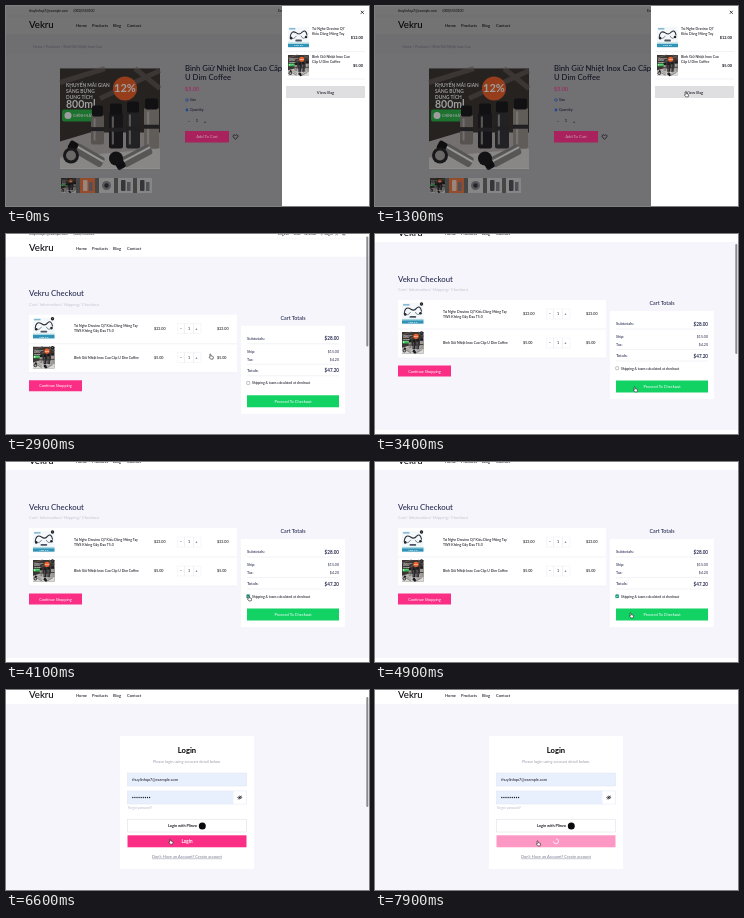
Recreate the animation shown at these times as an HTML page. Size 363 px wide and 200 px high, loop 8000 ms.

```html
<!DOCTYPE html>
<html lang="en">
<head>
<meta charset="utf-8">
<title>Shop checkout</title>
<style>
html, body { margin: 0; width: 100%; height: 100%; overflow: hidden; background: #fff; }
svg { display: block; width: 100vw; height: 100vh; font-family: Lato, "Open Sans", sans-serif; }
</style>
</head>
<body>
<svg id="stage" viewBox="0 0 363 200"></svg>
<script>
const PINK = '#fb2e86', NAVY = '#252b50', INK = '#151520', GREY = '#9a9dae', PALE = '#f6f5fb', GREEN = '#12d264';
const BRAND = 'Vekru', EMAIL = 'thuylinhqa7@example.com';
const FLASK = 'Bình Giữ Nhiệt Inox Cao Cấp';

const rect = (x, y, w, h, fill, more = '') =>
  `<rect x="${x}" y="${y}" width="${w}" height="${h}" fill="${fill}" ${more}/>`;
const circle = (x, y, r, fill, more = '') => `<circle cx="${x}" cy="${y}" r="${r}" fill="${fill}" ${more}/>`;
const path = (d, stroke, width = 0.6, fill = 'none', more = '') =>
  `<path d="${d}" stroke="${stroke}" stroke-width="${width}" fill="${fill}" ${more}/>`;
const line = (x1, x2, y, stroke = '#e6e6ee') => path(`M${x1} ${y}H${x2}`, stroke, 0.5);
const shade = (x, y, w, h, opacity) => rect(x, y, w, h, '#000', `opacity="${opacity}"`);
// y is the vertical middle of the lettering
const text = (s, x, y, size = 3.5, fill = INK, weight = 400, anchor = 'start', more = '') =>
  `<text x="${x}" y="${y + size * 0.35}" font-size="${size}" fill="${fill}" font-weight="${weight}" text-anchor="${anchor}" ${more}>${s.replace(/&/g, '&amp;')}</text>`;
const mid = (s, x, y, size, fill, weight, more) => text(s, x, y, size, fill, weight, 'middle', more);
const end = (s, x, y, size, fill, weight) => text(s, x, y, size, fill, weight, 'end');
const group = (id, body, more = '') => `<g id="${id}" ${more}>${body}</g>`;
const place = (x, y, scale, body) => `<g transform="translate(${x} ${y}) scale(${scale})">${body}</g>`;

function header() {
  const nav = [['Home', 70], ['Products', 86], ['Blog', 107], ['Contact', 121]];
  const tools = [['English', 272], ['USD', 287.5], ['Wishlist', 298], ['Login', 318.5]];
  return rect(0, 0, 363, 28, '#fff') + line(0, 363, 10, '#f1f0f6') +
    text(EMAIL, 23, 5, 3.3) + text('(000)5550100', 67.5, 5, 3.3) +
    tools.map(([s, x]) => text(s, x, 5, 3.5)).join('') +
    path('M314 4q1-1.3 1.6 0q.7-1.3 1.6 0q0 1-1.6 2.2q-1.6-1.2-1.6-2.2z', INK, 0.4) +
    circle(330.6, 4.2, 0.7, INK) + path('M329.4 6.3q1.2-1.6 2.4 0', INK, 0.5) +
    path('M335 3h1l.8 3h2.6', INK, 0.6) + circle(339.5, 3, 2.2, '#e11d48') + mid('2', 339.5, 3, 2.6, '#fff') +
    text(BRAND, 23, 19, 9.6, '#0c0c12', 500) +
    nav.map(([s, x]) => text(s, x, 19.3, 4.1, INK, 500)).join('');
}
const pinkEdge = () => rect(0, 0, 363, 0.8, '#f9cfe6');

// Product pictures, drawn on a 100 x 100 square
function flasks() {
  const bottle = (x, y, w, h, tone) =>
    rect(x, y, w, h, tone, 'rx="2"') + rect(x + 1, y - 9, w - 2, 11, '#1c1b1e', 'rx="2"') +
    rect(x + w * 0.2, y + 4, w * 0.15, h - 8, '#d6d2cd', 'opacity=".6"') + rect(x, y + h * 0.42, w, 4, '#343236');
  const lying = (x, y, turn, tone) => `<g transform="translate(${x} ${y}) rotate(${turn})">` +
    rect(0, 0, 32, 11, tone, 'rx="3"') + rect(0, 3, 32, 2, '#f1f1f1') + rect(-7, 1, 9, 9, '#18181b', 'rx="2"') + '</g>';
  return rect(0, 0, 100, 100, '#3b3634') + path('M0 14L45 0M40 30L100 2M75 0L100 20', '#5f5753', 5) +
    path('M0 100V73L30 64H100V100z', 'none', 0, '#b9b5b3') + path('M0 100V89L100 80V100z', 'none', 0, '#dcdad8') +
    circle(65, 20, 12, '#f2642d') + mid('12%', 65, 20, 11, '#fff', 700) +
    text('KHUYẾN MÃI GIAN', 6, 17, 4.8, '#fff', 700) + text('SÁNG BỪNG', 6, 23, 4.8, '#fff', 700) +
    text('DUNG TÍCH', 6, 28.5, 4.8, '#fff', 700) + text('800ml', 6, 35.5, 10.5, '#fff', 700) +
    rect(2, 41, 35, 12, '#2fb84c', 'rx="2"') + circle(8, 47, 3.5, '#fff') + text('CHÍNH HÃNG', 13, 47, 3.6, '#fff', 700) +
    bottle(31, 46, 13, 30, '#8a8580') + bottle(49, 44, 14, 36, '#242327') +
    bottle(66, 42, 14, 38, '#37353a') + bottle(84, 39, 15, 41, '#9a948e') +
    lying(18, 74, 30, '#8e8b89') + lying(60, 90, -28, '#8e8b89') +
    circle(11, 87, 8, '#29282c') + circle(11, 87, 5, '#aaa7a5') + circle(56, 90, 7, '#1d1c20');
}
function earbuds() {
  return rect(0, 0, 100, 100, '#f4f8fa') + rect(0, 80, 100, 16, '#2f93b8') + rect(0, 74, 100, 6, '#a7d6df') +
    path('M10 50Q14 12 40 28Q56 40 68 24Q85 8 91 40', '#2a2e36', 5) +
    path('M12 50Q28 62 40 42M62 42Q72 65 90 43', '#6d7680', 4) +
    circle(15, 53, 6, '#20242d') + circle(86, 48, 6, '#20242d') + rect(5, 5, 30, 7, '#7fb6d2') +
    rect(35, 60, 31, 9, '#4b5261', 'rx="4"') + mid('TWS 5.0', 50, 88, 11, '#fff', 700);
}

function productPage() {
  const thumbs = [0, 1, 2, 3, 4].map(i => {
    const x = 55 + i * 19;
    if (!i) return place(x, 172, 0.15, flasks());
    return rect(x, 172, 15, 15, i === 1 ? '#ee7a48' : '#d8d8da') +
      (i === 2 ? circle(x + 7.5, 179.5, 4.5, '#8b8c92') + circle(x + 7.5, 179.5, 2.2, '#38383f')
        : rect(x + 3, 174, 4.5, 11, i === 1 ? '#f7d6c8' : '#55565e', 'rx="1"') + rect(x + 9, 176, 3.5, 9, '#83848c'));
  }).join('');
  // Saturated parts lie above the page shade with a lighter one of their own
  return rect(0, 0, 363, 200, '#fbfaff') + header() + rect(0, 28, 363, 20, PALE) +
    text('Home / Products / Bình Giữ Nhiệt Inox Cao', 27, 41, 3.6, '#a9abc0') +
    text(FLASK, 179, 62, 7.7, NAVY, 500) + text('U Dim Coffee', 179, 71, 7.7, NAVY, 500) +
    text('Size', 184, 94, 3.5, NAVY) + text('Quantity', 184, 104, 3.5, NAVY) +
    mid('−', 183, 115, 4.5) + mid('1', 191, 115, 4) + mid('+', 199, 115, 4.5) +
    path('M229.5 133.2q-4-3-1.6-4.3q1-.4 1.6.7q.7-1.1 1.7-.7q2.3 1.3-1.7 4.3z', INK, 0.7) +
    shade(0, 0, 363, 200, 0.55) +
    place(54, 62.5, 1, flasks()) + shade(54, 62.5, 100, 100, 0.38) + thumbs + shade(55, 172, 91, 15, 0.38) +
    text('$5.00', 179, 83, 5.5, '#a3215c') +
    circle(181, 94, 1.3, 'none', 'stroke="#24488f" stroke-width=".8"') + circle(181, 104, 1.4, '#24488f') +
    rect(179, 125, 44, 11.5, '#a9215d') + mid('Add To Cart', 201, 131, 4.2, '#c9a3b4');
}

function drawer() {
  const item = (y, art, a, b, price) => place(282, y, 0.21, art) +
    text(a, 306, y + 2.2, 3.55, INK, 500) + text(b, 306, y + 7, 3.55, INK, 500) + end(price, 357, y + 10.5, 3.9, INK, 700);
  return rect(276, 0, 87, 200, '#fff') +
    path('M354.8 4.8l3 3m0-3l-3 3', INK, 0.8) +
    item(21, earbuds(), 'Tai Nghe Dravino Q7', 'Kiểu Dáng Móng Tay', '$12.00') + line(280, 359, 45.5) +
    item(49, flasks(), 'Bình Giữ Nhiệt Inox Cao', 'Cấp U Dim Coffee', '$5.00') + line(280, 359, 73) +
    rect(280, 80, 79, 12, '#dfdfe2') + mid('View Bag', 319.5, 86.2, 4.2, INK, 500);
}

function checkoutPage() {
  const row = (y, art, lines, price) => place(27, y - 11, 0.215, art) +
    circle(46.5, y - 10, 1.7, '#111') + path(`M45.9 ${y - 10.6}l1.2 1.2m0-1.2l-1.2 1.2`, '#fff', 0.35) +
    lines.map((s, i) => text(s, 68, y + (i - (lines.length - 1) / 2) * 5, 3.45, INK, 500)).join('') +
    text(price, 148, y, 3.7, INK, 500) + text(price, 211, y, 3.7, INK, 500) +
    rect(171.5, y - 5, 23.5, 10, '#fff', 'stroke="#ececf2" stroke-width=".4"') +
    path(`M178.5 ${y - 5}v10m9 0v-10`, '#dcdce5', 0.4) +
    mid('−', 175, y, 4) + mid('1', 183, y, 3.6) + mid('+', 190.5, y, 4);
  const sum = (label, price, y, big) => text(label, 241, y, big ? 4.1 : 3.7, NAVY, 500) +
    end(price, 333, y, big ? 4.6 : 3.6, NAVY, big ? 700 : 400);
  return rect(0, 0, 363, 216, PALE) + rect(0, 216, 363, 60, '#fff') + header() + pinkEdge() +
    text(BRAND + ' Checkout', 23, 65, 7.8, NAVY, 500) +
    text('Cart/ Information/ Shipping/ Checkout', 23, 76, 4.1, '#c3c4d2') +
    rect(23, 86, 208, 58, '#fff') + line(23, 231, 115) +
    row(100, earbuds(), ['Tai Nghe Dravino Q7 Kiểu Dáng Móng Tay', 'TWS Không Gây Đau T5.0'], '$23.00') +
    row(129, flasks(), [FLASK + ' U Dim Coffee'], '$5.00') + line(23, 231, 144) +
    rect(23, 151.5, 53, 11, PINK) + mid('Continue Shopping', 49.5, 157.2, 3.9, '#fff') +
    mid('Cart Totals', 287, 89, 5.4, NAVY, 500) + rect(235, 97, 104, 88, '#fff') +
    sum('Subtotals:', '$28.00', 110, true) + line(241, 333, 115) +
    sum('Ship:', '$15.00', 122.7) + sum('Tax:', '$4.20', 131) + line(241, 333, 135.5) +
    sum('Totals:', '$47.20', 142, true) + line(241, 333, 147) +
    rect(240.7, 152.7, 3, 3, '#fff', 'stroke="#888" stroke-width=".5" rx=".5"') +
    group('tick', rect(240.5, 152.5, 3.4, 3.4, '#189b83', 'rx=".5"') + path('M241.2 154.2l.8.8l1.3-1.6', '#fff', 0.5)) +
    text('Shipping & taxes calculated at checkout', 246, 154.5, 3.35, INK, 500) +
    rect(241, 166.5, 92, 12, GREEN) + mid('Proceed To Checkout', 287, 172.6, 4, '#fff');
}

function loginPage() {
  const dots = Array.from({ length: 9 }, (_, i) => circle(126.8 + i * 2.1, 121.5, 0.65, INK)).join('');
  const field = (y, w) => rect(121.5, y, w, 13, '#e8f0fe', 'stroke="#dbe2ee" stroke-width=".5"');
  return rect(0, 0, 363, 260, PALE) + header() + pinkEdge() + rect(114, 60, 134, 133, '#fff') +
    mid('Login', 181, 74.5, 7.6, '#000', 700) + mid('Please login using account detail below.', 181, 86, 3.95, GREY) +
    field(97, 119) + text(EMAIL, 126, 103.3, 3.9) + field(115, 119) + dots +
    rect(227.5, 115.2, 12.8, 12.6, '#fff') +
    path('M231.5 121.5q2.3-3 4.6 0q-2.3 3-4.6 0z', INK, 0.6) + circle(233.8, 121.5, 0.8, INK) +
    path('M232 123.5l3.6-4', INK, 0.5) +
    text('Forgot password?', 122, 132, 3.1, '#b9bccb') +
    rect(121.5, 143.2, 119, 12.8, '#fff', 'stroke="#dcdce4" stroke-width=".5"') +
    text('Login with Plinvo', 162, 150, 3.8, INK, 700) + circle(196.3, 150, 3.5, '#0b0b0d') +
    group('loginButton', rect(121.5, 159.3, 119, 12, PINK) + mid('Login', 181, 165.2, 4.6, '#fff', 700)) +
    group('busy', rect(121.5, 159.3, 119, 12, '#fd97c3') +
      group('spinner', path('M181 162.8a2.5 2.5 0 1 1-2.5 2.5', '#fff', 0.8))) +
    mid("Don't Have an Account? Create account", 181, 180.3, 4, '#777a90', 400, 'text-decoration="underline"');
}

const hand = path('M0 0q.7-.5 1 .2l.4 1.6l1.7.4q.7.2.5 1l-.4 1.7h-2.3l-1.5-1.8q0-.7.9-.2z', '#111', 0.55, '#fff');

const stage = document.getElementById('stage');
stage.innerHTML =
  group('product', productPage() + drawer()) + group('checkout', checkoutPage()) + group('login', loginPage()) +
  group('bar', rect(360.3, 0, 2, 110, '#8a8a8f', 'rx="1"')) + group('cursor', hand);
const el = Object.fromEntries([...stage.querySelectorAll('[id]')].map(n => [n.id, n]));

const LOOP = 8000, BAG_OPENS = 1800, TICKED = 4000, LOGIN_OPENS = 5300, SUBMIT = 6900;
const cursorPath = [
  [200, 214, 132], [600, 311, 86], [1000, 310, 86], [1800, 310, 86], [2200, 189, 111],
  [2700, 190, 112], [3400, 259, 153], [3500, 259, 153], [3800, 242, 134], [4500, 242, 134],
  [4900, 255, 151], [5300, 255, 151], [5700, 168.5, 142], [6300, 166, 146], [6800, 162, 151]
];
const checkoutScroll = [[2700, 0], [3300, 20]];
const loginScroll = [[5700, 0], [6250, 14]];

function at(track, t) {
  const i = track.findIndex(step => step[0] > t);
  if (i === 0) return track[0].slice(1);
  if (i < 0) return track[track.length - 1].slice(1);
  const a = track[i - 1], b = track[i];
  const p = (t - a[0]) / (b[0] - a[0]), eased = p * p * (3 - 2 * p);
  return a.slice(1).map((v, k) => v + (b[k + 1] - v) * eased);
}
const show = (node, on) => node.setAttribute('display', on ? 'inline' : 'none');
const move = (node, x, y) => node.setAttribute('transform', `translate(${x} ${y})`);

function draw(t) {
  const onLogin = t >= LOGIN_OPENS, onCheckout = t >= BAG_OPENS && !onLogin;
  const [down] = at(onLogin ? loginScroll : checkoutScroll, t);
  show(el.product, t < BAG_OPENS);
  show(el.checkout, onCheckout);
  show(el.login, onLogin);
  move(el.checkout, 0, -down);
  move(el.login, 0, -down);
  show(el.tick, t >= TICKED);
  show(el.bar, (t > 2700 && t < 3900) || (t >= LOGIN_OPENS && t < 6800));
  move(el.bar, 0, down / 2);
  show(el.loginButton, t < SUBMIT);
  show(el.busy, t >= SUBMIT);
  el.spinner.setAttribute('transform', `rotate(${(t - SUBMIT) * 0.36} 181 165.3)`);
  show(el.cursor, t >= 200);
  move(el.cursor, ...at(cursorPath, t));
}

const start = performance.now();
function tick() {
  draw((performance.now() - start) % LOOP);
  requestAnimationFrame(tick);
}
tick();
</script>
</body>
</html>
```
